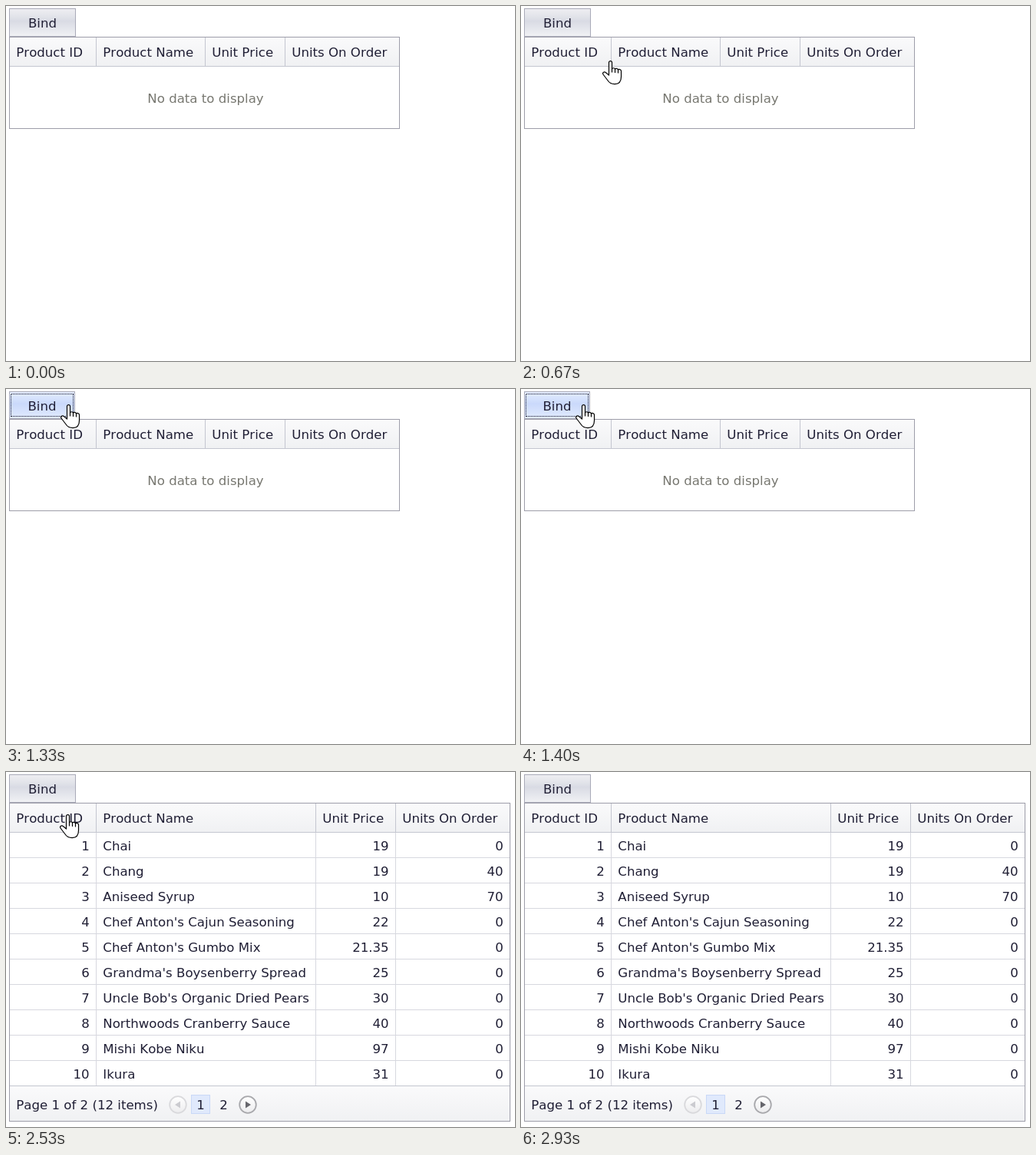
An HTML page for the animation above (3940 ms loop, 663x462 px).

```html
<!DOCTYPE html>
<html lang="en">
<head>
<meta charset="utf-8">
<title>Bind grid</title>
<style>
  html, body { margin: 0; width: 100%; height: 100%; overflow: hidden; background: #fff; }
  svg { display: block; }
  text { font: 16.6px Verdana, "DejaVu Sans", sans-serif; font-kerning: none; fill: #201f35; white-space: pre; }
  .end { text-anchor: end; }
  .mid { text-anchor: middle; }
  .hint { fill: #777770; }
  rect { shape-rendering: crispEdges; }
</style>
</head>
<body>
<svg id="stage" width="663" height="462" viewBox="0 0 663 462">
  <defs>
    <linearGradient id="bar" x2="0" y2="1">
      <stop stop-color="#fafafb"/><stop offset="1" stop-color="#f0f1f3"/>
    </linearGradient>
    <linearGradient id="idle" x2="0" y2="1">
      <stop stop-color="#ededf1"/><stop offset=".2" stop-color="#e6e7ec"/>
      <stop offset=".45" stop-color="#d9dbe4"/><stop offset="1" stop-color="#f0f1f4"/>
    </linearGradient>
    <linearGradient id="hover" x2="0" y2="1">
      <stop stop-color="#e4ecfd"/><stop offset=".2" stop-color="#d8e4fd"/>
      <stop offset=".45" stop-color="#cad9fb"/><stop offset="1" stop-color="#e0eafe"/>
    </linearGradient>
    <linearGradient id="knob" x2="0" y2="1">
      <stop stop-color="#fff"/><stop offset="1" stop-color="#ececee"/>
    </linearGradient>
  </defs>
  <g id="button"></g>
  <g id="empty"></g>
  <g id="full"></g>
  <g id="hand" stroke="#000" stroke-width="1.2" stroke-linejoin="round" stroke-linecap="round">
    <path fill="#fff" d="M8.5 19V2.6a2 2 0 0 1 4 0V11c.6-1.8 3.6-1.6 4 .4 .6-1.6 3.6-1.2 4 .8
      .8-1.4 4-.8 4 1.6V21c0 6-3.2 9.6-8.4 9.6-4.4 0-7-1.4-9-4.6L1 18c-1.4-2.4 1.6-4.2 3.6-2.2Z"/>
    <path fill="none" d="M12.5 10.5V15M16.5 11.4V15.4M20.5 12.2V16"/>
  </g>
</svg>
<script>
const byId = id => document.getElementById(id);
const box = (x, y, w, h, fill) => `<rect x="${x}" y="${y}" width="${w}" height="${h}" fill="${fill}"/>`;
const label = (x, y, s, cls = '') => `<text x="${x}" y="${y}" class="${cls}">${s}</text>`;
const frame = (x, y, w, h, edge, fill) => box(x, y, w, h, edge) + box(x + 1, y + 1, w - 2, h - 2, fill);

const PAD = 8.3, TOP = 40, HEAD = 78, ROW = 33;
const EDGE = '#9d9da9', HEAD_LINE = '#c4c6d0', ROW_LINE = '#d7d8df';
const titles = ['Product ID', 'Product Name', 'Unit Price', 'Units On Order'];
const products = [
  ['Chai', 19, 0], ['Chang', 19, 40], ['Aniseed Syrup', 10, 70],
  ["Chef Anton's Cajun Seasoning", 22, 0], ["Chef Anton's Gumbo Mix", 21.35, 0],
  ["Grandma's Boysenberry Spread", 25, 0], ["Uncle Bob's Organic Dried Pears", 30, 0],
  ['Northwoods Cranberry Sauce', 40, 0], ['Mishi Kobe Niku', 97, 0], ['Ikura', 31, 0]
];

// edges: x of every vertical line, from the left border to the right one
function table(edges, bottom) {
  const left = edges[0], width = edges[4] - left + 1;
  return frame(left, TOP, width, bottom - TOP + 1, EDGE, '#fff') +
    box(left + 1, TOP + 1, width - 2, HEAD - TOP - 1, 'url(#bar)') +
    box(left + 1, HEAD, width - 2, 1, HEAD_LINE) +
    edges.slice(1, 4).map(x => box(x, TOP + 1, 1, HEAD - TOP, HEAD_LINE)).join('') +
    titles.map((s, i) => label(edges[i] + 1 + PAD, 66, s)).join('');
}

function knob(x, dir, ring, arrow) {
  return `<circle cx="${x}" cy="433" r="10.8" fill="url(#knob)" stroke="${ring}" stroke-width="1.8"/>
    <path d="M${x + 4 * dir} 433l${-7 * dir} -4.5v9z" fill="${arrow}"/>`;
}

function fullTable() {
  const edges = [4, 117, 403, 507, 656], foot = HEAD + ROW * products.length;
  let s = table(edges, 454);
  products.forEach(([name, price, units], i) => {
    const y = HEAD + ROW * i, base = y + 24;
    s += box(5, y + ROW, 651, 1, i < 9 ? ROW_LINE : HEAD_LINE) +
      label(edges[1] - PAD, base, i + 1, 'end') +
      label(edges[1] + 1 + PAD, base, name) +
      label(edges[3] - PAD, base, price, 'end') +
      label(edges[4] - PAD, base, units, 'end');
  });
  for (const x of edges.slice(1, 4)) s += box(x, HEAD + 1, 1, foot - HEAD - 1, ROW_LINE);
  return s + box(5, foot + 1, 651, 454 - foot - 1, 'url(#bar)') +
    label(5 + PAD, 439, 'Page 1 of 2 (12 items)') +
    knob(224, -1, '#d9d9dc', '#cbcbd0') +
    frame(241, 420, 25, 25, '#c9d8f7', '#e0e9fc') +
    label(253.5, 439, 1, 'mid') + label(283.5, 439, 2, 'mid') +
    knob(315, 1, '#a8a8ac', '#66666c');
}

function drawButton(fill, pressed) {
  const w = pressed ? 86 : 87, h = pressed ? 36 : 37;
  const focus = pressed
    ? '<path d="M7 6.5H88M7 35.5H88M6.5 7V36M87.5 7V36" stroke="#101020" stroke-dasharray="1 1"/>' : '';
  return frame(4, 3, w, h, '#a9aab8', `url(#${fill})`) + focus + label(4 + w / 2, 28, 'Bind', 'mid');
}

// Pointer corner at a given tick, or null while it is off stage
function pointer(tick) {
  if (tick < 4 || tick > 43) return null;
  if (tick >= 38) {
    const u = (tick - 37) / 6;
    return [71 - 9 * u, 20 + 420 * u ** 1.39];
  }
  if (tick >= 16) return [71, 20];
  const rest = Math.max(0, 1 - (tick - 4) / 10);
  return [72 + 170 * rest ** 1.75, 21 + 355 * rest ** 2.15];
}

byId('empty').innerHTML = table([4, 117, 259, 363, 512], 159) +
  label(260, 126, 'No data to display', 'mid hint');
byId('full').innerHTML = fullTable();

const LOOP = 3940, TICKS_PER_MS = 15 / 1000;
const show = (id, on) => byId(id).setAttribute('visibility', on ? 'visible' : 'hidden');
let lastTick = -1;

function render(now) {
  const tick = Math.floor((now % LOOP + 5) * TICKS_PER_MS);
  if (tick !== lastTick) {
    lastTick = tick;
    const bound = tick >= 25, pressed = tick >= 20 && !bound;
    const at = pointer(tick);
    byId('button').innerHTML = drawButton(tick >= 13 && !bound ? 'hover' : 'idle', pressed);
    byId('empty').setAttribute('transform', `translate(0 ${pressed ? -1 : 0})`);
    show('empty', !bound);
    show('full', bound);
    show('hand', at);
    if (at) byId('hand').setAttribute('transform', `translate(${at.map(Math.round)})`);
  }
}

const start = performance.now();
function loop() {
  render(performance.now() - start);
  requestAnimationFrame(loop);
}
loop();
</script>
</body>
</html>
```
